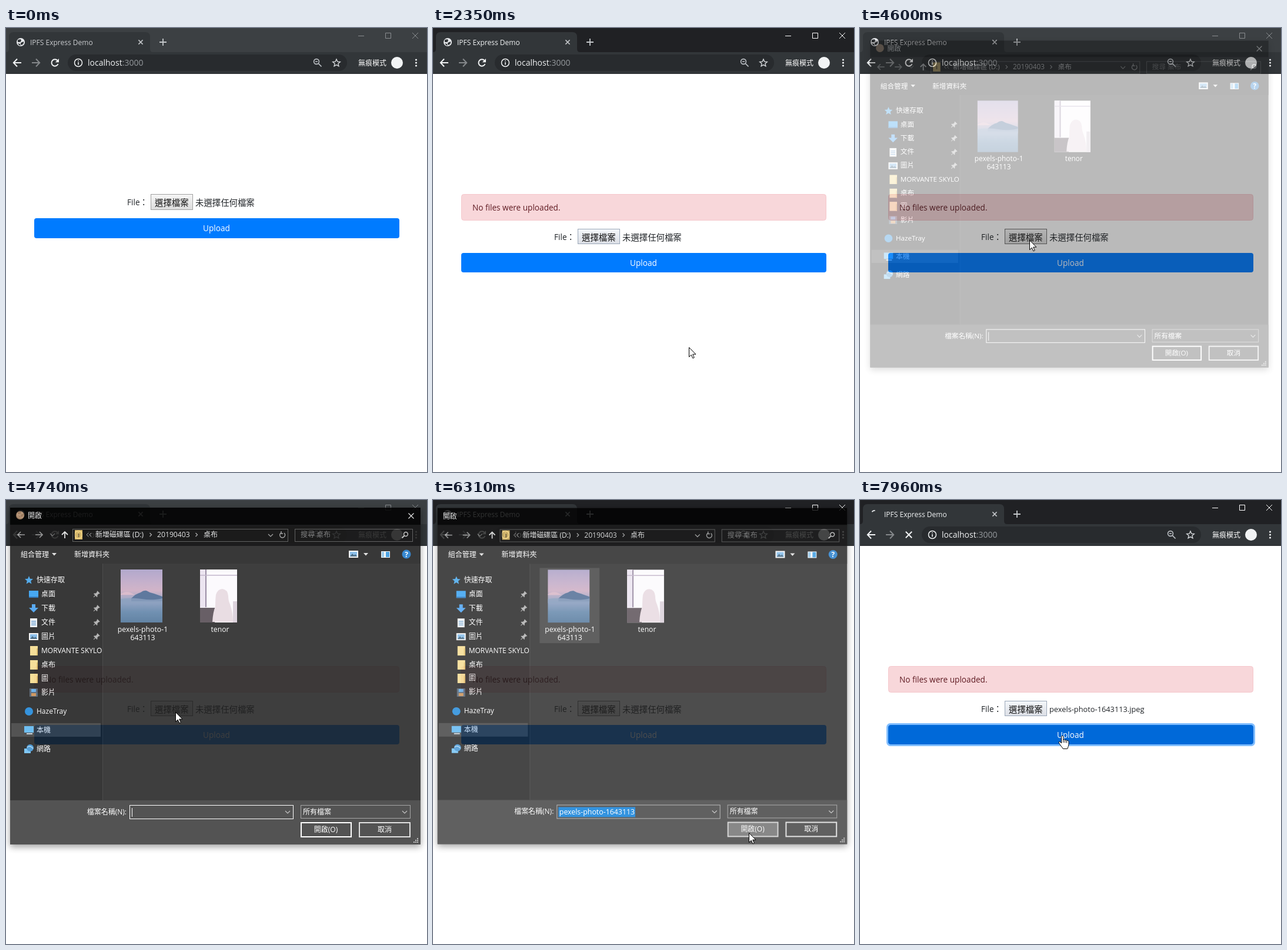
Write an HTML page that moves like this. It is 716 px wide and 754 px high and loops after 8 s.

```html
<!DOCTYPE html>
<html lang="zh-Hant">
<head>
<meta charset="utf-8">
<title>IPFS Express Demo</title>
<style>
  html, body { margin: 0; width: 100%; height: 100%; overflow: hidden; background: #fff; }
  svg { display: block; width: 716px; height: 754px; }
  text { font-family: 'Open Sans', 'Noto Sans CJK TC', 'Noto Sans CJK JP', 'Noto Sans CJK', sans-serif; white-space: pre; }
  #panel { filter: drop-shadow(0 4px 6px rgba(0, 0, 0, .45)); }
</style>
</head>
<body>
<svg id="stage" viewBox="0 0 716 754" xmlns="http://www.w3.org/2000/svg"></svg>
<script>
const LOOP = 8000;
const FILE_NAME = 'pexels-photo-1643113';
const FOOTER = '#383838';

// Markup helpers
const text = (x, y, str, size = 12, fill = '#fff', extra = '') =>
  `<text x="${x}" y="${y}" font-size="${size}" fill="${fill}" ${extra}>${str}</text>`;
const rect = (x, y, w, h, fill, extra = '') =>
  `<rect x="${x}" y="${y}" width="${w}" height="${h}" fill="${fill}" ${extra}/>`;
const frame = (x, y, w, h, stroke, fill = 'none', width = 1) =>
  rect(x + width / 2, y + width / 2, w - width, h - width, fill, `stroke="${stroke}" stroke-width="${width}"`);
const line = (d, stroke = '#fff', width = 1, extra = '') =>
  `<path d="${d}" fill="none" stroke="${stroke}" stroke-width="${width}" ${extra}/>`;
const shape = (d, fill, extra = '') => `<path d="${d}" fill="${fill}" ${extra}/>`;
const disc = (x, y, r, fill, extra = '') => `<circle cx="${x}" cy="${y}" r="${r}" fill="${fill}" ${extra}/>`;
const cross = (x, y, r, stroke, width) =>
  line(`M${x - r} ${y - r}l${2 * r} ${2 * r}m0 ${-2 * r}l${-2 * r} ${2 * r}`, stroke, width);
const chevron = (x, y, stroke = '#bbb') => line(`M${x - 4} ${y - 2}l4 4 4-4`, stroke, 1.2);
const group = (id, body, extra = '') => `<g id="${id}" ${extra}>${body}</g>`;
const gradient = (id, ...colors) =>
  `<linearGradient id="${id}" x2="0" y2="1">${colors.map((c, i) =>
    `<stop offset="${i / (colors.length - 1)}" stop-color="${c}"/>`).join('')}</linearGradient>`;

const defs = `<defs>
  ${gradient('buttonIdle', '#f6f6f6', '#dcdcdc')}
  ${gradient('buttonActive', '#f4f7fa', '#dcdfe6')}
  ${gradient('dusk', '#a69bc4', '#b9a3c4', '#cba9c0', '#8497bb', '#5b80a6', '#4a7096')}
  <clipPath id="navClip"><rect x="7" y="108" width="156" height="402"/></clipPath>
</defs>`;

function browser() {
  return rect(0, 0, 716, 42, '#3c4043', 'id="strip"') +
    shape('M0 41Q5 41 5 35V15Q5 7 13 7H237Q245 7 245 15V35Q245 41 250 41H716V78H0Z', '#323639') +
    rect(0, 77, 716, 1, '#292c2f') +
    group('favicon', disc(25, 24, 7, '#e8eaed') +
      shape('M20 20l5-1 1 3-2 2-4 0zM25 25l5-2 0 3-3 3-2-1zM20 26l4 1 1 3-3-1z', '#323639')) +
    line('M20.4 20.1A6 6 0 0 1 25.6 18', '#e8eaed', 1.8, 'id="spinner"') +
    text(41, 29, 'IPFS Express Demo', 12, '#c8cacd', 'id="tabTitle"') +
    cross(229, 24, 3.6, '#c4c7ca', 1.5) + line('M261 24h12m-6-6v12', '#c4c7ca', 1.8) +
    group('controls', line('M599 13.5h10M645.5 8.5h9v9h-9ZM691 8l10 10m0-10l-10 10', 'inherit', 1)) +
    line('M26 59H13M19 52.5L12.8 59l6.2 6.5', '#f1f3f4', 2) +
    line('M44 59h13M51 52.5l6.2 6.5-6.2 6.5', '#85888b', 2) +
    group('reload', line('M87.5 55.2A5.7 5.7 0 1 0 88.5 61', '#f1f3f4', 2) + shape('M90 52v6.2h-6.2Z', '#f1f3f4')) +
    group('stop', cross(83, 59, 5.2, '#f1f3f4', 2)) +
    rect(105, 45, 475, 28, '#282b2e', 'rx="14"') +
    disc(123, 59, 6.5, 'none', 'stroke="#f1f3f4" stroke-width="1.5"') + line('M123 58v4.5M123 55v1.6', '#f1f3f4', 1.6) +
    text(139, 64, 'localhost<tspan fill="#969a9e">:3000</tspan>', 14, '#f1f3f4') +
    disc(528, 57, 4.4, 'none', 'stroke="#bdc1c6" stroke-width="1.6"') + line('M531.5 60.5l5 5M526 57h4', '#bdc1c6', 1.7) +
    line('M562 53l1.8 4.1 4.5.4-3.4 3 1 4.4-3.9-2.3-3.9 2.3 1-4.4-3.4-3 4.5-.4Z', '#d4d7da', 1.4) +
    text(599, 64, '無痕模式') + disc(665, 59, 10, '#f1f3f4') +
    [54, 59, 64].map(y => disc(697.5, y, 1.6, '#f1f3f4')).join('');
}

function page() {
  const form = text(206, 301, 'File', 13.6, '#212529') + text(227, 301, '：', 14.4, '#212529') +
    rect(246.5, 282.5, 71, 26, 'url(#buttonIdle)', 'id="fileButton" stroke="#a0a0a0"') +
    text(253, 302, '選擇檔案', 14.4, '#111') +
    text(322, 302, '未選擇任何檔案', 14.4, '#212529', 'id="noFile"') +
    text(322, 301, FILE_NAME + '.jpeg', 12.8, '#212529', 'id="chosen"') +
    rect(46.5, 321.5, 624, 36, 'none', 'id="ring" rx="5" stroke="#80bdff" stroke-width="3"') +
    rect(48, 323, 621, 34, '#007bff', 'id="upload" rx="4"') +
    text(358, 345, 'Upload', 13.6, '#fff', 'text-anchor="middle" font-weight="500"');
  return group('alert', rect(48.5, 282.5, 620, 44, '#f8d7da', 'rx="4" stroke="#f5c6cb"') +
      text(67, 310, 'No files were uploaded.', 13.6, '#5f1a21')) +
    group('form', form) +
    group('tooltip', rect(291, 383, 96, 19, '#000', 'opacity=".3"') +
      frame(288, 380, 97, 20, '#767676', '#fff') + text(295, 394, '未選擇任何檔案', 12, '#575757'));
}

function navIcon(kind, x, y) {
  const icons = {
    star: () => shape(`M${x} ${y - 7}l2 4.7 5 .4-3.8 3.3 1.2 5-4.4-2.7-4.4 2.7 1.2-5-3.8-3.3 5-.4Z`, '#3ba0e8'),
    desk: () => rect(x - 8, y - 6, 16, 12, '#2b9bf0') + rect(x - 8, y + 4, 16, 2, '#1769b5'),
    down: () => shape(`M${x - 3} ${y - 7}h6v6h5l-8 8-8-8h5Z`, '#3f9df0'),
    doc: () => rect(x - 6, y - 7, 12, 15, '#f1f3f5') + line(`M${x - 4} ${y - 2}h8m-8 3h8m-8 3h8`, '#5793c9', 1.3),
    picture: () => rect(x - 8, y - 6, 16, 12, '#f5f5f5') + rect(x - 6, y - 4, 12, 8, '#7bb7e8') + shape(`M${x - 6} ${y + 4}l4-5 3 3 2-2 3 4Z`, '#355b77'),
    folder: () => rect(x - 6, y - 8, 13, 16, '#f5da8a') + rect(x + 5, y - 4, 2, 12, '#dcb75a'),
    film: () => rect(x - 7, y - 7, 14, 14, '#49596b') + rect(x - 4, y - 6, 8, 5, '#58a8e8') + rect(x - 4, y + 1, 8, 5, '#c98a4a'),
    drive: () => disc(x, y, 7, '#1683d8'),
    pc: () => rect(x - 8, y - 7, 16, 11, '#58b4f0') + rect(x - 4, y + 5, 10, 2, '#c7d5de'),
    net: () => rect(x - 8, y - 1, 11, 8, '#6dbff3') + disc(x + 2, y - 2, 6, '#3a8fd0') + line(`M${x - 3} ${y - 3}q5-4 10 2`, '#b8def5', 1.2),
  };
  return icons[kind]();
}

function navigation() {
  const items = [
    ['快速存取', 135, 'star', 0], ['桌面', 159, 'desk', 1], ['下載', 183, 'down', 1], ['文件', 207, 'doc', 1],
    ['圖片', 231, 'picture', 1], ['MORVANTE SKYLO', 255, 'folder', 1], ['桌布', 279, 'folder', 1],
    ['圖', 302, 'folder', 1], ['影片', 326, 'film', 1], ['HazeTray', 358, 'drive', 0],
    ['本機', 390, 'pc', 0], ['網路', 422, 'net', 0],
  ];
  const pin = y => `<g transform="translate(154 ${y}) rotate(45)">${shape('M-3-5h6v1l-1 1v3l2 2v1h-8v-1l2-2v-3l-1-1ZM-.5 3h1v4h-1Z', '#aaa')}</g>`;
  return rect(7, 108, 157, 402, '#191919') + rect(164, 108, 1, 402, '#303030') + rect(9, 379, 152, 23, '#383838') +
    `<g clip-path="url(#navClip)">${items.map(([label, y, icon, depth]) =>
      navIcon(icon, depth ? 47 : 39, y + 1) + text(depth ? 60 : 52, y + 4.5, label)).join('')}</g>` +
    [160, 184, 208, 232].map(pin).join('');
}

function thumbnails() {
  return rect(181, 115, 102, 128, '#383838', 'id="tile"') +
    rect(195, 118, 71, 90, 'url(#dusk)') +
    shape('M195 160q8-6 16-3l8 4H195Z', '#d5b2c4') +
    shape('M213 167q8-8 16-10 5-4 10-3 6 4 13 5l14 5v8H213Z', '#46648f') +
    shape('M195 168q18-3 36 0t35-1v8H195Z', '#7b94b7', 'opacity=".8"') +
    text(232.5, 224, 'pexels-photo-1', 12.3, '#fff', 'text-anchor="middle"') +
    text(232.5, 238, '643113', 12.3, '#fff', 'text-anchor="middle"') +
    rect(330, 118, 63, 90, '#fcfafd') + rect(330, 118, 10, 64, '#e9e1ee') +
    rect(339, 118, 2, 64, '#8b7b96') + rect(330, 127, 63, 1.5, '#b9abc3') +
    shape('M330 183h25v25h-25Z', '#51464e') + rect(386, 172, 7, 36, '#d8cdd8') +
    shape('M351 207q1-17 5-26 0-12 1-20 3-10 11-10 9 1 10 12 0 8 3 14 5 14 5 30Z', '#e6d8df') +
    text(364, 224, 'tenor', 12.2, '#fff', 'text-anchor="middle"');
}

function dialogMarkup() {
  const triangle = (x, y) => shape(`M${x - 4} ${y - 2}h8l-4 4.5Z`, '#ddd');
  const grip = [[0, 0], [-3, 0], [-6, 0], [0, -3], [-3, -3], [0, -6]]
    .map(([x, y]) => rect(699 + x, 580 + y, 2, 2, '#bbb')).join('');
  const top = rect(7, 13, 698, 29, '#000') + text(37, 31, '開啟', 12, '#fff', 'id="dialogTitle"') +
    group('caption', disc(24, 26, 7, '#b08a68') + cross(689, 27, 4.5, '#fff', 1.2)) +
    rect(7, 42, 698, 66, '#191919') +
    line('M32 59H20M25 54l-5 5 5 5', '#a5a5a5', 1.7) + line('M50 59h12M57 54l5 5-5 5', '#a5a5a5', 1.7) +
    chevron(79, 59, '#777') + line('M100 65V54M95 59l5-5 5 5', '#fff', 1.8) +
    frame(113, 49, 367, 22, '#6b6b6b') + rect(117, 51, 13, 16, '#f2cf75') + line('M123.5 57v6', '#76623a', 2) +
    line('M140 56l-3 3 3 3m5-6l-3 3 3 3', '#bbb') + text(152, 63, '新增磁碟區 (D:)') +
    line('M244.5 56l3 3-3 3M322.5 56l3 3-3 3', '#ccc', 1.2) + text(257, 63, '20190403', 12.2) + text(336, 63, '桌布') +
    chevron(450, 60) + line('M473 56A4.5 4.5 0 1 1 468 55.5M468 53v4h3', '#bbb', 1.4) +
    frame(491, 49, 201, 22, '#6b6b6b') + text(501, 63, '搜尋 桌布', 12, '#8c8c8c') +
    disc(680, 58, 3.4, 'none', 'stroke="#ddd" stroke-width="1.5"') + line('M677.5 60.5l-4 4', '#ddd', 1.8) +
    text(25, 96.5, '組合管理') + triangle(82, 92) + text(116, 96.5, '新增資料夾') +
    navIcon('picture', 591, 92) + triangle(612, 92) +
    rect(638, 87, 15, 11, '#f3f7fa') + rect(646, 88, 6, 9, '#3196df') + rect(639, 88, 4, 9, '#8cc3e8') +
    disc(681, 92, 7.5, '#1976c9') + text(681, 96.5, '?', 12, '#fff', 'text-anchor="middle" font-weight="700"');
  const bottom = rect(7, 510, 698, 75, FOOTER) + text(205, 534, '檔案名稱(N):', 12, '#fff', 'text-anchor="end"') +
    rect(210.5, 518.5, 278, 23, FOOTER, 'id="nameBox" stroke="#fff"') + chevron(479, 530) +
    rect(214, 523, 1, 15, '#fff', 'id="caret"') + rect(213, 522, 131, 17, '#0078d7', 'id="selection"') +
    text(214.5, 535, FILE_NAME, 12.4, '#fff', 'id="nameText"') +
    frame(501, 518, 187, 23, '#999', FOOTER) + text(505, 534, '所有檔案') + chevron(678, 530) +
    rect(502, 548, 85, 24, FOOTER, 'id="openButton" stroke="#fff" stroke-width="2"') +
    text(544, 564, '開啟(O)', 12, '#fff', 'text-anchor="middle"') +
    frame(600, 547, 88, 26, '#ddd', FOOTER, 2) + text(644, 564, '取消', 12, '#fff', 'text-anchor="middle"') + grip;
  return rect(7, 13, 698, 572, '#202020', 'id="panel"') + top + navigation() + thumbnails() + bottom;
}

const cursorMarkup =
  group('arrow', shape('M.5.5V16.6L4.2 13.1 6.9 18.8 9.3 17.7 6.7 12.1H12Z', '#fff', 'stroke="#000"')) +
  group('hand', shape('M-1.5 13V1.3Q0-1 1.7 1.3V7.2Q3.2 5.9 4.7 7.6 6.2 6.6 7.6 8.4 9.4 7.5 11 9.8V15Q10.5 18.5 8.8 22.5H1.2Q0 20-2 18L-5 13.5Q-7 10.5-4.5 10.2-3.5 10.3-1.5 13Z',
    '#fff', 'stroke="#000" stroke-linejoin="round"') + line('M1.7 7v5M4.7 7.8v4.5M7.6 8.6v4', '#000', 1));

stage.innerHTML = defs + rect(0, 0, 716, 754, '#fff') + browser() + page() +
  group('dialog', dialogMarkup()) + group('cursor', cursorMarkup);

// Tracks: rows of [time, ...values]
const cursorPath = [
  [240, 590, 686], [1000, 288, 294], [1420, 288, 294], [1540, 289, 340], [2260, 289, 340], [2350, 435, 542],
  [3180, 435, 542], [3700, 288, 360], [4990, 288, 360], [5500, 240, 180], [5840, 240, 180], [6140, 537, 565],
  [6350, 537, 565], [6640, 400, 488], [6690, 400, 488], [6790, 333, 440], [6880, 333, 440], [7090, 344, 400],
];
const hoverTrack = [
  [1430, 0], [1560, 1], [1960, 1], [1961, 0], [3380, 0], [3480, .7], [3520, .7], [3650, 0], [7030, 0], [7170, 1],
];
const dialogTrack = [[4540, 0, .95], [4600, .3, .97], [4740, .86, 1], [4840, 1, 1], [6260, 1, 1], [6310, .8, .998], [6500, 0, .95]];
const tooltipTrack = [[3930, 0], [4030, .63], [4130, 1]];
const ringTrack = [[7720, 0], [7860, 1]];

const smooth = p => p * p * (3 - 2 * p);
function sample(track, t, ease = p => p) {
  const next = track.findIndex(row => row[0] > t);
  if (next === 0) return track[0].slice(1);
  if (next < 0) return track.at(-1).slice(1);
  const a = track[next - 1], b = track[next], p = ease((t - a[0]) / (b[0] - a[0]));
  return a.slice(1).map((v, i) => v + (b[i + 1] - v) * p);
}

const el = id => document.getElementById(id);
const set = (id, attrs) => { for (const name in attrs) el(id).setAttribute(name, attrs[name]); };
const show = (id, on) => set(id, { visibility: on ? 'inherit' : 'hidden' });
const within = (t, from, to) => t >= from && t < to;

function render(t) {
  const active = within(t, 1890, 4380) || t >= 6270;
  const loading = within(t, 1920, 2010) || t >= 7850;
  const reloaded = t >= 1960;
  const picked = t >= 6400;

  set('strip', { fill: active ? '#202124' : '#3c4043' });
  set('tabTitle', { fill: active ? '#f1f3f4' : '#c8cacd' });
  set('controls', { stroke: active ? '#fff' : '#8a8d90' });
  show('favicon', !loading);
  show('spinner', loading);
  set('spinner', { transform: `rotate(${(7960 - t) * .3} 25 24)` });
  show('reload', !loading);
  show('stop', loading);

  const overFile = within(t, 970, 1450) || within(t, 3650, 6400);
  show('alert', reloaded);
  set('form', { transform: `translate(0 ${reloaded ? 59 : 0})` });
  set('fileButton', {
    fill: active && !overFile ? 'url(#buttonActive)' : 'url(#buttonIdle)',
    stroke: overFile ? '#6b6b6b' : active ? '#9aa7b8' : '#a0a0a0',
    height: reloaded ? 25 : 26,
  });
  show('noFile', !picked);
  show('chosen', picked);
  const hover = sample(hoverTrack, t)[0];
  set('upload', { fill: `rgb(0 ${123 - 18 * hover} ${255 - 38 * hover})`, height: reloaded ? 33 : 34 });
  set('ring', { opacity: sample(ringTrack, t)[0] });
  set('tooltip', { opacity: t < 4380 ? sample(tooltipTrack, t)[0] : 0 });

  const [opacity, scale] = sample(dialogTrack, t);
  const named = t >= 5600, confirmed = t >= 6180, closing = t >= 6270;
  show('dialog', opacity > 0);
  set('dialog', { opacity, transform: `translate(356 299) scale(${scale}) translate(-356 -299)` });
  show('caption', !closing);
  set('dialogTitle', { x: closing ? 16 : 37 });
  show('tile', t >= 5380);
  set('tile', { fill: t < 5600 ? '#4d4d4d' : confirmed ? '#383838' : '#777' });
  set('nameBox', { stroke: named ? '#aaa' : '#fff' });
  show('caret', !named);
  show('nameText', named);
  show('selection', confirmed);
  set('openButton', { fill: t >= 6120 ? '#6a6a6a' : FOOTER, stroke: closing ? '#ccc' : '#fff' });

  const hand = within(t, 1500, 2260) || t >= 7070;
  show('cursor', t >= 240);
  show('arrow', !hand);
  show('hand', hand);
  set('cursor', { transform: `translate(${sample(cursorPath, t, smooth).map(Math.round).join(' ')})` });
}

const start = performance.now();
function tick() {
  render((performance.now() - start) % LOOP);
  requestAnimationFrame(tick);
}
tick();
</script>
</body>
</html>
```
